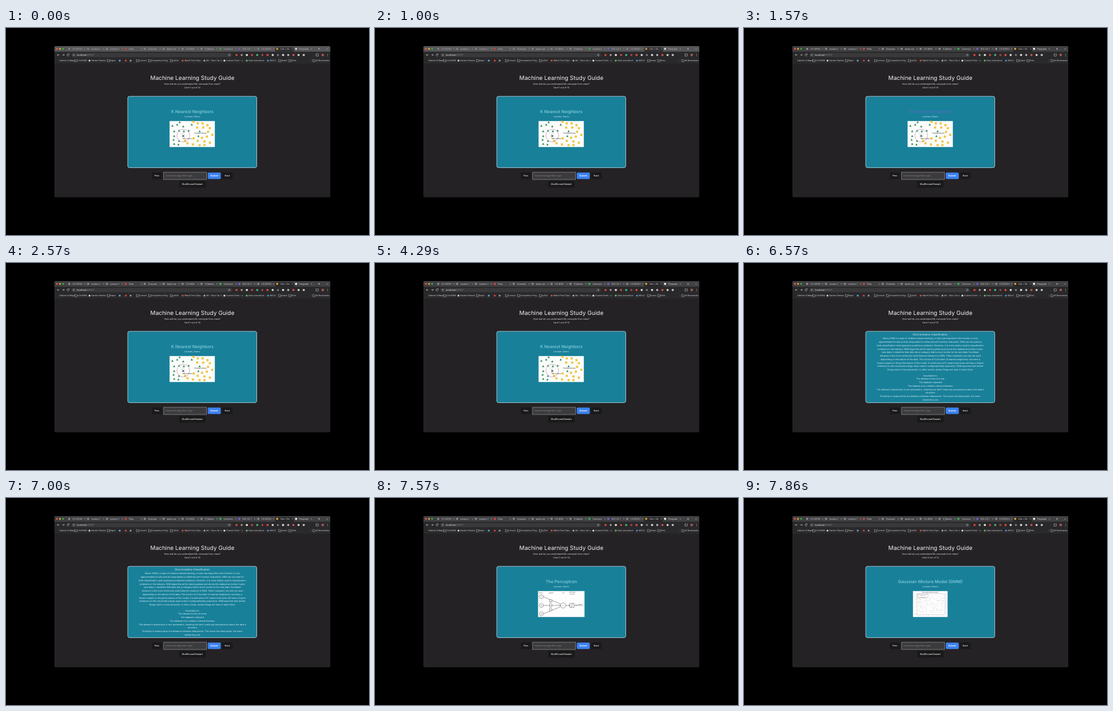
Animation, 600 px wide and 343 px high, one loop 8000 ms. Source, as an HTML page:

```html
<!DOCTYPE html>
<html lang="en">
<head>
<meta charset="utf-8">
<title>Study Guide</title>
<style>
html, body { margin: 0; width: 100%; height: 100%; overflow: hidden; background: #000; }
svg { display: block; width: 100vw; height: 100vh; }
text { font-family: Inter, sans-serif; text-rendering: geometricPrecision; }
</style>
</head>
<body>
<svg id="stage" viewBox="0 0 600 343" preserveAspectRatio="none"></svg>
<script>
const NS = "http://www.w3.org/2000/svg";
const stage = document.getElementById("stage");
const LOOP = 8000;

function add(parent, tag, attrs) {
  const el = document.createElementNS(NS, tag);
  for (const k in attrs) el.setAttribute(k, attrs[k]);
  parent.appendChild(el);
  return el;
}
const group = (parent = stage) => add(parent, "g", {});
const rect = (p, x, y, width, height, fill, more) =>
  add(p, "rect", { x, y, width, height, fill, ...more });
const dot = (p, cx, cy, r, fill, more) => add(p, "circle", { cx, cy, r, fill, ...more });
const path = (p, d, stroke, width = 0.5, more) =>
  add(p, "path", { d, stroke, "stroke-width": width, fill: "none", ...more });
function label(p, x, y, size, fill, str, more) {
  const el = add(p, "text", { x, y, "font-size": size, fill, ...more });
  el.textContent = str;
  return el;
}
const centered = (p, y, size, fill, str, more) =>
  label(p, 308, y, size, fill, str, { "text-anchor": "middle", ...more });

function seeded(seed) {
  return () => (seed = (seed * 16807) % 2147483647) / 2147483647;
}

// Browser window
rect(stage, 0, 0, 600, 343, "#000");
rect(stage, 80, 30, 456, 250.5, "#242225", { rx: 2 });
const strip = path(stage, "M80 39.5V32q0-2 2-2H534q2 0 2 2V39.5Z", "none", 0);
rect(stage, 80, 39.5, 456, 18.5, "#29282a");
["#ff5f57", "#febc2e", "#28c840"].forEach((c, i) => dot(stage, 84.2 + i * 5.1, 34.6, 1.4, c));

const tabs = group();
const tabNames = ["CS 62750", "Lecture 1", "Lecture 1", "Files", "(Canvas)", "taylor ser", "CS 4650",
  "17_Rando", "Common", "(53) CS 1", "CS 62750", "Vite + Re", "Pregrade"];
const tabIcons = { 3: "#d9463e", 8: "#35b558", 9: "#7960d8", 11: "#e0a33a", 12: "#f2f2f2" };
path(tabs, "M445 39.5V34q0-2 2-2H474q2 0 2 2V39.5Z", "none", 0, { fill: "#29282a" });
tabNames.forEach((name, i) => {
  const x = 104.5 + i * 31.25;
  dot(tabs, x, 34.6, 1.8, tabIcons[i] || "#8c8c90");
  label(tabs, x + 5, 36, 3.6, "#e4e4e6", name);
  path(tabs, `M${x + 24.3} 33.7l1.8 1.8m0-1.8l-1.8 1.8`, "#d0d0d2", 0.45);
  if (i < 10) path(tabs, `M${x + 28.2} 32.5v4.5`, "#77777a", 0.4);
});
path(tabs, "M515.8 34.6h3.2m-1.6-1.6v3.2M529.2 34l1.5 1.5 1.5-1.5", "#e0e0e0", 0.5);

// Toolbar
path(stage, "M88.2 44.6h-3.4m1.5-1.5l-1.5 1.5 1.5 1.5M93 44.6h3.4m-1.5-1.5l1.5 1.5-1.5 1.5", "#d6d6d6", 0.6);
path(stage, "M104.2 43.6a1.8 1.8 0 1 0 .1 1.8M104.5 42.5v1.4h-1.4", "#d6d6d6", 0.6);
rect(stage, 108, 41.2, 265.5, 7, "#39383a", { rx: 3.5 });
dot(stage, 112, 44.7, 1.4, "none", { stroke: "#c8c8c8", "stroke-width": 0.5 });
const url = label(stage, 117, 46, 3.8, "#f5f5f5", "localhost");
add(url, "tspan", { fill: "#929296" }).textContent = ":5173/?";
dot(stage, 369, 44.7, 1.4, "none", { stroke: "#d0d0d0", "stroke-width": 0.5 });
["#e5463d", "#a88f86", "#e9e9e9", "#d8433d", "#45b886", "#a94444", "#e34c48", "#dddddd",
 "#77777c", "#e4e4e4", "#b8b8bc", "#d2574f", "#d5d5d5", "#cccccc"].forEach((c, i) =>
  dot(stage, 381 + i * 8.55, 44.7, 1.8, c));
rect(stage, 512.7, 43, 3.5, 3.4, "none", { stroke: "#dedede", "stroke-width": 0.5 });
dot(stage, 523.5, 44.7, 2.1, "#a35b56");
[43.2, 44.7, 46.2].forEach(y => dot(stage, 531.5, y, 0.45, "#e2e2e2"));

// Bookmarks
function folder(x) {
  path(stage, `M${x} 52.2h1.4l.7.7h1.7v3h-3.8Z`, "#c9c9cb", 0.5);
}
const marks = [
  [88, "Cabinet of Maps"], [118, "COURSES", 1], [141, "Garden Planner", "#d6d6d6"], [172, "Paper", 1],
  [191, "", "#68a3df"], [201, "", "#dc453f"], [209, "", "#9a9a9a"], [220, "Convert", 1],
  [240, "Competitive Prog...", 1], [276, "LaTeX", 1], [295, "Watch Free Clips...", "#e04a42"],
  [331, "ML - Race Car L...", "#a7a7ab"], [364, "Custom Fonts - J...", "#e5e5e5"],
  [401, "Data Journalism", "#62c06b"], [436, "MOLD", "#4b8de0"], [455, "Guard", 1], [472, "Plots", 1]
];
marks.forEach(([x, name, icon]) => {
  if (icon === 1) folder(x - 4.5);
  else if (icon) dot(stage, x - 3, 54, 1.6, icon);
  label(stage, x, 55.2, 3.35, "#dedee0", name);
});
path(stage, "M504 51.5v5", "#65656a", 0.4);
folder(507);
label(stage, 512, 55.2, 3.35, "#dedee0", "All Bookmarks");
path(stage, "M80 58h456", "#39383b", 0.4);

// Page
const PAGE = "#e2e2e3";
centered(stage, 86, 9.55, "#f0f0f1", "Machine Learning Study Guide");
centered(stage, 94, 3.65, PAGE, "How well do you understand ML concepts from class?");
const count = centered(stage, 99.8, 3.65, PAGE, "");
rect(stage, 201.2, 113.2, 213.3, 118.2, "#19809a", { rx: 3, stroke: "#d8eef2", "stroke-width": 0.7 });

function button(x, y, w, h, str, fill = "#19191a", weight = 500) {
  rect(stage, x, y, w, h, fill, { rx: 1.7 });
  label(stage, x + w / 2, y + h / 2 + 1.3, 3.75, "#f3f3f3", str,
    { "text-anchor": "middle", "font-weight": weight });
}
button(241, 239.2, 17, 11.4, "Prev");
rect(stage, 260.7, 239, 70.8, 12, "#3b3a3c", { stroke: "#858587", "stroke-width": 0.8 });
label(stage, 264, 246.3, 3.75, "#858588", "Guess the algorithm type");
button(333.5, 239.5, 21.5, 10.8, "Submit", "#3c82f0", 700);
button(357, 239.2, 17.6, 11.4, "Next");
button(286, 253, 44, 11.4, "Shuffle and Restart");

// Card fronts
const LINK = "#86d0df";
function front(title) {
  const g = group();
  g.heading = centered(g, 141.3, 7.05, LINK, title, { "font-weight": 500 });
  centered(g, 148.4, 3.65, "#b5e2ea", "Lecture, Demo", { "font-weight": 500 });
  return g;
}

const knn = front("K Nearest Neighbors");
rect(knn, 270.4, 154.2, 74.8, 43, "#fcfdfb");
[[287, 156], [275, 162], [283, 160], [293, 163], [307, 160], [278, 171], [286, 170], [294, 171], [302, 170],
 [278, 179], [277, 185], [278, 192], [286, 187], [285, 193], [318, 179], [320, 171]].forEach(([x, y]) =>
  path(knn, `M${x - 1.9} ${y + 1.5}l1.9-3.3 1.9 3.3Z`, "none", 0, { fill: "#23855d" }));
[[310, 155.5], [317, 158], [325, 158], [333, 161], [316, 165], [326, 165], [337, 166], [341, 177],
 [332, 180], [324, 182], [310, 183], [317, 187], [328, 188], [337, 190], [300, 191], [309, 193],
 [320, 194], [328, 194], [296, 187], [334, 172]].forEach(([x, y]) => {
  rect(knn, x - 1.7, y - 1.7, 3.4, 3.4, "#efbd2b");
  rect(knn, x - 0.5, y - 0.5, 1, 1, "#f9dc83");
});
dot(knn, 293, 178.3, 10.5, "none", { stroke: "#c990b3", "stroke-width": 0.7 });
path(knn, "M293 178.3V169M293 178.3l-7-7", "#7db9a0", 0.4);
path(knn, "M291.3 177.4l3.4 3.4m0-3.4l-3.4 3.4", "#222", 0.9);
label(knn, 292, 184, 2.35, "#222", "New instance", { "font-weight": 600 });
label(knn, 311, 175.2, 2.35, "#222", "Training instances", { "font-weight": 600 });

const net = front("The Perceptron");
rect(net, 269.5, 154.2, 76.8, 43, "#fdfdfd");
const INK = "#454545";
const small = (x, y, s) => label(net, x, y, 2.3, INK, s, { "text-anchor": "middle" });
[["inputs", 274], ["weights", 291], ["sum", 311]].forEach(([s, x]) => small(x, 157.8, s));
small(326, 157.2, "activation");
small(326, 160.2, "function");
[163.5, 178, 192].forEach((y, i) => {
  const mid = (y + 178) / 2;
  path(net, `M278 ${y}L306.5 ${178 + (i - 1) * 2.4}`, INK, 0.5);
  dot(net, 275, y, 3.3, "#fff", { stroke: INK, "stroke-width": 0.5 });
  small(275, y + 0.8, "x" + (i + 1));
  rect(net, 288.4, mid - 2.2, 4.2, 4.4, "#fff", { stroke: INK, "stroke-width": 0.4 });
  small(290.5, mid + 0.8, "w" + (i + 1));
});
path(net, "M315 178h7M329 178h4M333 178h11", INK, 0.5);
path(net, "M320.4 177l1.6 1-1.6 1M305 177l1.6 1-1.6 1M331.7 177l1.6 1-1.6 1", INK, 0.5);
dot(net, 311, 178, 4.3, "#fff", { stroke: INK, "stroke-width": 0.5 });
small(311, 179, "Σ");
rect(net, 322, 174.8, 7, 6.4, "#fff", { stroke: INK, "stroke-width": 0.5 });
path(net, "M323.3 180h2.2v-3.8h2.2", INK, 0.4);
small(338.7, 177.2, "output");

const gmm = front("Gaussian Mixture Model (GMM)");
rect(gmm, 279.3, 154.2, 57.2, 43, "#fdfdfd");
label(gmm, 308, 157.4, 2.2, "#444d70", "Gaussian mixture clusters",
  { "text-anchor": "middle", "font-weight": 600 });
rect(gmm, 286, 158.8, 46.5, 34.5, "none", { stroke: "#9599a3", "stroke-width": 0.35 });
const rnd = seeded(41);
const tints = ["#9aa9df", "#e5ad9d", "#aebdd8", "#e4c99c"];
for (let i = 0; i < 190; i++) {
  const x = 288 + rnd() * 43, y = 161 + rnd() * 30;
  dot(gmm, x, y, 0.42, tints[Math.floor(rnd() * tints.length)]);
}
rect(gmm, 287, 159.8, 17, 6, "#fff", { stroke: "#777", "stroke-width": 0.3 });
[0, 1].forEach(i => {
  dot(gmm, 289, 161.6 + i * 2.4, 0.5, tints[i]);
  label(gmm, 290.5, 162.3 + i * 2.4, 1.8, "#555", "component " + (i + 1));
});
for (let i = 0; i < 6; i++) {
  label(gmm, 288 + i * 8.4, 195.9, 1.7, "#777", i - 2, { "text-anchor": "middle" });
  label(gmm, 284.8, 192.5 - i * 6, 1.7, "#777", i, { "text-anchor": "end" });
}

// Card back
const back = group();
centered(back, 120, 4.35, "#e2f2f4", "Discriminative Classification");
const notes = `Notes: KNN is a type of instance-based learning, or lazy learning where the function is only
approximated locally and all computation is deferred until function evaluation. KNN can be used for
both classification and regression predictive problems. However, it is more widely used in classification
problems in the industry. KNN algorithm at the training phase just stores the dataset and when it gets
new data, it classifies that data into a category that is much similar to the new data. Euclidean
distance is the most commonly used distance measure in KNN. Other measures can also be used
depending on the nature of the data. The choice of K (number of nearest neighbors) can have a
drastic impact on the performance of the model. A small value of K means that noise will have a higher
influence on the result and a large value make it computationally expensive. KNN assumes that similar
things exist in close proximity. In other words, similar things are near to each other.`;
const facts = `Assumptions:
The dataset is free of noise
The dataset is labeled
The dataset only contains relevant features
The dataset's distribution is non-parametric, meaning we don't make any assumptions about the data's
structure
Similarity is measured by the distance between data points. The closer the data points, the more
similar they are`;
function lines(str, top) {
  str.split("\n").forEach((s, i) => centered(back, top + i * 5.73, 3.65, "#d8edf1", s));
}
lines(notes, 126.4);
lines(facts, 187.7);

const clamp = v => Math.max(0, Math.min(1, v));
const blend = (a, b, k) => `rgb(${a.map((v, i) => Math.round(v + (b[i] - v) * k))})`;

// [start time, visible face, card number]
const scenes = [[0, knn, 1], [5860, back, 1], [7430, net, 3], [7860, gmm, 4]];

function draw(t) {
  const [, face, number] = scenes.filter(s => t >= s[0]).pop();
  for (const g of [knn, net, gmm, back]) g.setAttribute("display", g === face ? "inline" : "none");
  count.textContent = `Card ${number} out of 14`;

  const hover = clamp((t - 1430) / 140) - clamp((t - 2290) / 250);
  knn.heading.setAttribute("fill", blend([134, 208, 223], [76, 111, 190], hover));

  const focused = t >= 1140;
  strip.setAttribute("fill", focused ? "#414043" : "#565558");
  tabs.setAttribute("opacity", focused ? 1 : 0.8);
}

const start = performance.now();
function tick() {
  draw((performance.now() - start) % LOOP);
  requestAnimationFrame(tick);
}
draw(0);
requestAnimationFrame(tick);
</script>
</body>
</html>
```
